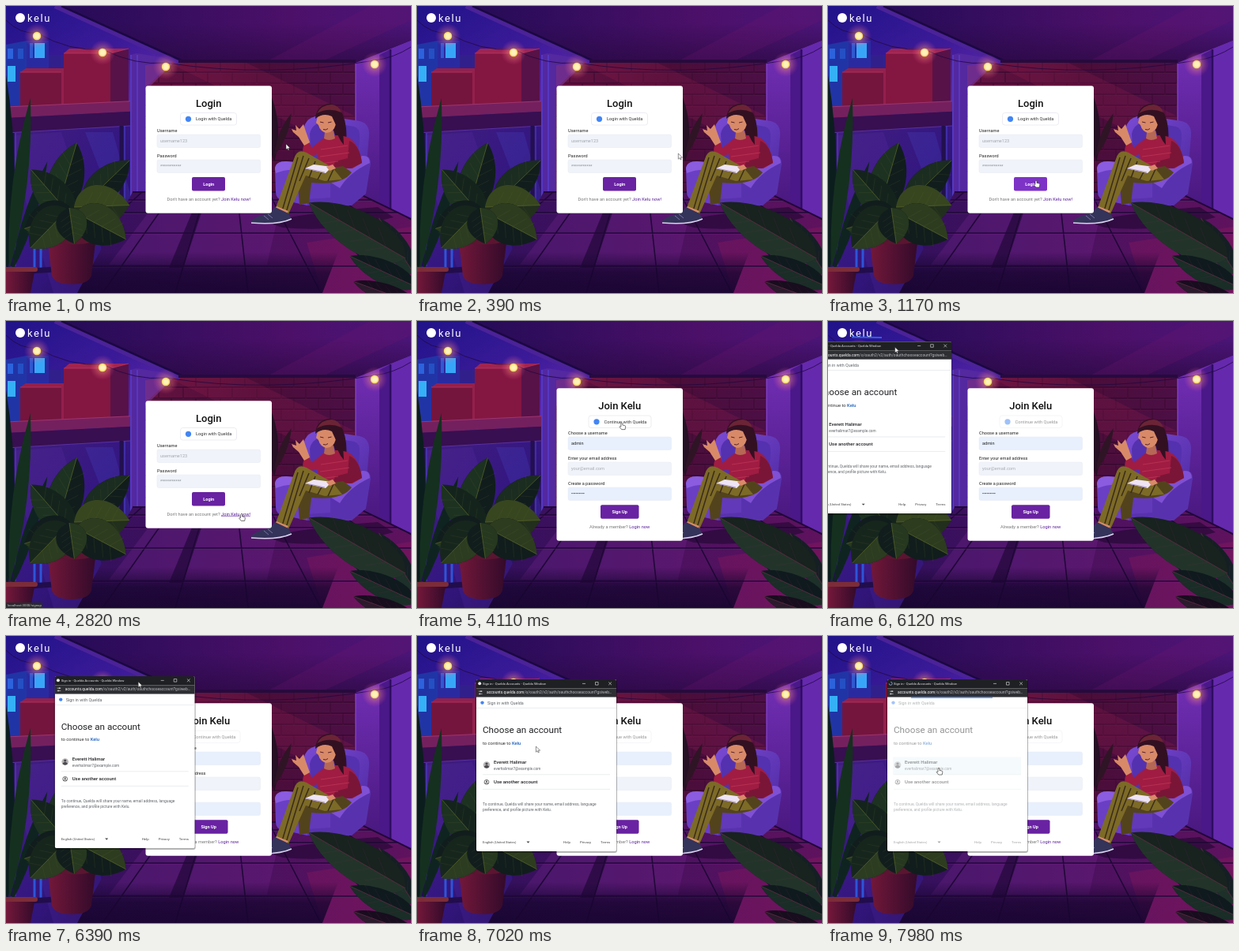
Animation, 512 px wide and 364 px high, one loop 8000 ms. Source, as an HTML page:

```html
<!DOCTYPE html>
<html lang="en">
<head>
<meta charset="utf-8">
<title>Sign-up flow</title>
<style>
html, body { margin: 0; width: 100%; height: 100%; overflow: hidden; background: #2c0c4c; }
svg { display: block; width: 100vw; height: 100vh; }
text { font-family: Roboto, "Open Sans", sans-serif; white-space: pre; }
</style>
</head>
<body>
<svg id="stage" viewBox="0 0 512 364" preserveAspectRatio="none">
  <defs>
    <linearGradient id="ceil"><stop offset="0" stop-color="#1c0a52"/><stop offset=".35" stop-color="#330d5e"/><stop offset=".7" stop-color="#4c1069"/><stop offset="1" stop-color="#4b1578"/></linearGradient>
    <linearGradient id="shade" x2="0" y2="1"><stop offset=".3" stop-color="#26083c" stop-opacity="0"/><stop offset="1" stop-color="#26083c" stop-opacity=".65"/></linearGradient>
    <linearGradient id="sky" x2="1" y2="1"><stop offset="0" stop-color="#20138a"/><stop offset=".5" stop-color="#3c1a98"/><stop offset="1" stop-color="#7030b8"/></linearGradient>
    <linearGradient id="glass" x2="1" y2="1"><stop offset="0" stop-color="#43207e"/><stop offset=".5" stop-color="#351781"/><stop offset="1" stop-color="#200b52"/></linearGradient>
    <linearGradient id="wall"><stop offset="0" stop-color="#661340"/><stop offset=".55" stop-color="#4b0d38"/><stop offset="1" stop-color="#4c0f46"/></linearGradient>
    <linearGradient id="side" x2="0" y2="1"><stop offset="0" stop-color="#7430b8"/><stop offset="1" stop-color="#401373"/></linearGradient>
    <linearGradient id="floor"><stop offset="0" stop-color="#32105c"/><stop offset=".45" stop-color="#471160"/><stop offset="1" stop-color="#5f125e"/></linearGradient>
    <linearGradient id="dusk" x2="0" y2="1"><stop offset="0" stop-color="#17052f" stop-opacity="0"/><stop offset=".5" stop-color="#17052f" stop-opacity=".75"/><stop offset="1" stop-color="#17052f" stop-opacity=".9"/></linearGradient>
    <linearGradient id="chair" x2="1" y2="1"><stop offset="0" stop-color="#7a4bd4"/><stop offset="1" stop-color="#4c279f"/></linearGradient>
    <linearGradient id="pot"><stop offset="0" stop-color="#74183a"/><stop offset="1" stop-color="#320a2a"/></linearGradient>
    <radialGradient id="glow"><stop offset="0" stop-color="#ffd060" stop-opacity=".6"/><stop offset="1" stop-color="#ff50a0" stop-opacity="0"/></radialGradient>
    <clipPath id="wallClip"><path d="M172 70H442V238H172z"/></clipPath>
    <clipPath id="floorClip"><path d="M160 236H442L512 270V364H90z"/></clipPath>
    <clipPath id="winClip"><rect width="177" height="218" rx="2"/></clipPath>
  </defs>
  <g id="scene"></g>
  <g id="login"></g>
  <g id="signup"></g>
  <g id="status"></g>
  <path id="streak" d="M30 20.5L68 21" stroke="#2b62e8" stroke-width="1.8"/>
  <g id="popup"></g>
  <g id="cursor"></g>
</svg>
<script>
const $ = id => document.getElementById(id);
const PURPLE = '#6822a2', HOVER = '#7d33c6', BLUE = '#4285f4';

const path = (d, fill, extra = '') => `<path d="${d}" fill="${fill}" ${extra}/>`;
const line = (d, color, w = 1, extra = '') => `<path d="${d}" fill="none" stroke="${color}" stroke-width="${w}" ${extra}/>`;
const box = (x, y, w, h, fill, r = 0, extra = '') => `<rect x="${x}" y="${y}" width="${w}" height="${h}" rx="${r}" fill="${fill}" ${extra}/>`;
const dot = (x, y, r, fill, extra = '') => `<circle cx="${x}" cy="${y}" r="${r}" fill="${fill}" ${extra}/>`;
const text = (x, y, size, s, fill = '#222', extra = '') => `<text x="${x}" y="${y}" font-size="${size}" fill="${fill}" ${extra}>${s}</text>`;
const mid = 'text-anchor="middle"', medium = 'font-weight="500"';
const times = (n, f) => Array.from({ length: n }, (_, i) => f(i)).join('');

// A broad leaf growing from (x, y) along an angle, one half lit.
function leaf(x, y, len, w, deg, dark, light, vein) {
  const veins = times(4, i => {
    const p = len * (.2 + i * .16);
    return `M${p} 0l${len * .15} ${-w * .5}M${p} 0l${len * .15} ${w * .5}`;
  });
  return `<g transform="translate(${x} ${y}) rotate(${deg})">` +
    path(`M0 0C${len * .1} ${-w} ${len * .7} ${-w} ${len} 0C${len * .7} ${w} ${len * .1} ${w} 0 0`, dark) +
    path(`M0 0C${len * .1} ${-w} ${len * .7} ${-w} ${len} 0z`, light) +
    line(`M0 0H${len}`, vein, .8, 'opacity=".8"') + line(veins, vein, .5, 'opacity=".3"') + '</g>';
}

function blade(x, y, len, w, deg, fill) {
  return path(`M0 0Q${len * .5} ${-w} ${len} 0Q${len * .5} ${w} 0 0`, fill, `transform="translate(${x} ${y}) rotate(${deg})"`);
}

function outside() {
  return path('M0 0H70L222 72V134H0z', 'url(#sky)') +
    path('M0 49L26 44V130H0z', '#2134a6') + path('M26 44H54V130H26z', '#2a2aa0') + path('M54 62H76V130H54z', '#31208c') +
    box(2, 76, 10, 20, '#35b0f6') + box(2, 54, 7, 13, '#2c62dc') + box(15, 54, 7, 13, '#2450c4') +
    box(36, 47, 13, 19, '#38a6f8') + box(30, 47, 4, 19, '#3058d0') +
    path('M18 84L25 79H74V130H18z', '#94204c') + path('M18 84H70V130H18z', '#74153e') +
    path('M73 60L80 54H155V128H73z', '#a02450') + path('M73 60H132V128H73z', '#831741') + path('M132 60L155 54V128H132z', '#571248') +
    line('M18 84H70M73 60H132L155 54', '#b73362', .8) +
    box(0, 130, 172, 234, 'url(#glass)') +
    path('M0 165L70 160 140 364H60z', '#6a38bc', 'opacity=".14"') + path('M100 160H135L172 290V345z', '#4a50d8', 'opacity=".2"') +
    path('M0 128L174 120V133L0 142z', '#74205f') + path('M0 142L174 133V151L0 161z', '#380f50') +
    line('M0 128L174 120', '#a0346f', 1.2) + line('M0 161L174 151', '#5a2fa4', 1) +
    line('M8 161V330M146 152V330', '#22104f', 5) + line('M12 161V330M150 152V320', '#4a3cc0', 1.2) +
    line('M36 302V336M44 302V336', '#2d55d8', 3) + line('M0 338L155 328', '#220d4c', 7);
}

function room() {
  const bricks = times(13, r => {
    const y = 70 + r * 14;
    return `M172 ${y}H442` + times(10, c => `M${178 + c * 31 + r % 2 * 15} ${y}v14`);
  });
  const tiles = times(13, i => `M${292 + (i - 6) * 40} 236L${306 + (i - 6) * 92} 364`);
  const rows = [246, 262, 288, 330].map(y => `M80 ${y}H512`).join('');
  return box(0, 0, 512, 364, 'url(#ceil)') + path('M70 0H512V60L442 72H222z', 'url(#shade)') +
    path('M400 70L512 18V0H460L330 70z', '#6c166c', 'opacity=".25"') + outside() +
    box(172, 70, 270, 168, 'url(#wall)') +
    `<g clip-path="url(#wallClip)">` + line(bricks, '#30082e', 1.3, 'opacity=".8"') +
    line(bricks, '#8a2450', .5, 'opacity=".45" transform="translate(0 1.2)"') +
    path('M202 70H300L442 140V190z', '#b82558', 'opacity=".16"') + '</g>' +
    path('M165 60L214 68 176 104V250H158V62z', '#54289f') + path('M176 75L212 72 176 108z', '#7a2f86', 'opacity=".7"') + line('M158 62V250M166 62V250', '#5438c0', 2) +
    line('M62 0L220 72', '#4b2298', 6) + line('M70 0L226 71', '#1b0842', 2.5) + path('M218 68H442V72H218z', '#270a3e') +
    path('M442 72L512 44V300L442 240z', 'url(#side)') + path('M472 62L486 55V266L472 258z', '#4a1888') +
    path('M486 55L512 44V290L486 266z', '#6529ae') + line('M486 55V266', '#2f0d62', 2.5) + line('M442 72V240', '#8140c6', 1.4) +
    path('M160 236H442L512 270V364H90z', 'url(#floor)') +
    `<g clip-path="url(#floorClip)">` + path('M180 262H345L330 328H130z', '#7a2a92', 'opacity=".28"') +
    path('M380 300L512 280V364H400z', '#98185c', 'opacity=".3"') +
    line(tiles + rows, '#200838', 1.6) + line(rows, '#7a2488', .5, 'opacity=".7" transform="translate(0 1.4)"') +
    path('M235 262L247 262 224 332H206z', '#210838', 'opacity=".7"') + path('M80 312H420L400 364H80z', 'url(#dusk)') + '</g>' +
    line('M160 236H442L512 270', '#220838', 2);
}

function reader() {
  const skin = '#d88a68', hair = '#321022';
  return path('M328 274Q380 262 470 255L490 268Q420 288 350 281z', '#1d0730', 'opacity=".6"') +
    blade(339, 198, 82, 13, -92, '#251024') + blade(339, 190, 58, 9, -68, '#2f1426') +
    // armchair
    path('M376 158Q378 138 402 139L447 146Q460 149 459 164L453 236H380z', 'url(#chair)') +
    path('M384 162Q387 147 406 147L440 153Q448 155 447 168L441 225H388z', '#5431ae') +
    path('M372 218L436 212V246L372 248z', '#6239b8') +
    path('M340 206Q341 197 354 197L374 199Q384 201 383 211L381 253 349 246Q341 244 341 236z', '#6a3fc4') +
    path('M340 206Q341 197 354 197L374 199Q384 201 383 211Q360 204 341 212z', '#8b5cdf') +
    path('M410 226Q412 208 426 204L450 190Q461 188 461 200L455 238 437 253 381 253V245L410 243z', '#5832ae') +
    path('M411 224Q413 208 426 204L450 190Q460 189 460 199Q434 211 422 231z', '#7f50d4') +
    // hair, sweater and raised arm
    path('M402 130Q418 122 426 138Q432 154 430 174L419 172 410 146z', hair) +
    path('M401 168Q415 161 431 166Q446 172 450 199L438 206 396 206 394 188 381 191Q372 186 377 176L384 173 386 180z', '#a01c42') +
    path('M434 171Q447 176 450 199L436 206 414 204 416 197 432 193z', '#7a1537') +
    line('M398 182L432 177M397 191L434 186M397 200L420 197', '#c03a58', .7) +
    path('M377 177L370 166 363 160 361 156 367 158 366 151 371 156 376 150 379 159 384 173z', skin) +
    path('M403 160L414 158 416 168Q408 172 402 168z', '#b66755') +
    path('M394 140Q402 133 413 138L417 150Q414 161 405 161Q397 159 395 151L392 148z', skin) +
    path('M391 143Q392 127 407 124Q421 123 425 140L427 176Q418 166 417 151L412 140Q401 135 391 143z', hair) +
    path('M393 136Q399 125 412 125Q421 126 424 135Q408 128 393 136z', '#6b2436') +
    line('M397 147l4.5 1M407 148l4.5-1M401 156.500q3.500 1.500 6-1', '#4a1526', .9) +
    // legs, book and shoe
    path('M426 203L437 211Q425 228 386 224L383 250 371 252 368 214z', '#53431c') +
    path('M413 205L380 186Q368 180 364 194L341 256 357 264 379 215 403 222 425 220z', '#7c6a27') +
    line('M369 192L349 260M376 190L354 262M383 193L371 222M391 197L383 218M403 203L394 220M414 207L407 222', '#3b2c1a', 1.5) +
    path('M378 206L389 201 412 204 404 212z', '#eee4f4') + line('M379 206L403 211', '#ad97cc', 1.2) +
    path('M405 204L413 201 417 206 409 209z', skin) +
    path('M342 254L357 260 353 266 339 261z', skin) +
    path('M309 273Q320 264 333 263L340 255 357 263 361 270Q344 277 314 276z', '#34335a') +
    line('M310 275Q344 278 361 270', '#d9d2ee', 1.6) + line('M326 266l6 5M331 264l6 5', '#8b87b6', .8);
}

function plants() {
  const dark = '#111d1c', green = '#1d3221', olive = '#37461f', vein = '#5d6a2c', pink = '#6b2c48';
  return blade(2, 340, 268, 22, -91, '#0c1d1e') + blade(4, 335, 220, 18, -83, '#15301f') + blade(-8, 300, 180, 18, -94, '#1b3a22') +
    blade(6, 340, 150, 14, -72, '#0f2420') +
    path('M0 332H37L31 364H0z', 'url(#pot)') + box(-4, 331, 44, 6, '#7c2c38', 3) +
    line('M84 300L62 240M84 300L108 240M84 300L45 275', '#1c3222', 3) +
    path('M52 292H114L108 342Q104 353 83 353Q62 353 58 342z', 'url(#pot)') + path('M51 290Q83 282 115 290V298Q83 307 51 298z', '#5a1530') +
    leaf(64, 262, 92, 30, -74, dark, green, vein) + leaf(100, 250, 78, 26, -44, dark, '#1b2c20', vein) +
    leaf(84, 268, 80, 28, -131, '#14241d', green, vein) + leaf(86, 262, 66, 32, 162, dark, '#26391f', vein) +
    leaf(86, 255, 70, 36, -2, '#222f1c', olive, vein) + leaf(88, 262, 72, 34, 28, dark, '#2d3c1f', vein) +
    leaf(78, 258, 68, 32, 134, '#17261d', '#2b3c20', vein) + leaf(80, 256, 46, 26, 82, dark, '#26381f', vein) +
    leaf(516, 340, 84, 18, -122, '#141f24', '#1d3029', pink) +
    leaf(505, 320, 141, 34, -150, '#18221f', '#22342a', pink) +
    leaf(518, 356, 92, 20, -155, '#0f1a1e', '#1a2d27', pink) +
    leaf(518, 378, 84, 16, -160, '#170d1e', '#2a1a2c', pink);
}

function lights() {
  const bulbs = [[39, 38], [122, 59], [202, 77], [466, 74]];
  return line('M0 18Q18 36 39 34Q80 58 122 55Q164 76 202 72Q330 92 466 69Q490 66 512 52', '#22083f', .8) +
    bulbs.map(([x, y]) => dot(x, y, 16, 'url(#glow)') + dot(x, y, 5.2, '#ffd76a') + dot(x, y, 3.8, '#fff2b8')).join('') +
    dot(18, 15, 6, '#fff') + text(27, 20, 13, 'kelu', '#fff', 'letter-spacing="1.6"');
}

const field = (y, label, value, fill, color) =>
  text(191, y - 3.3, 5.6, label) + box(191, y, 130.5, 16.5, fill, 2, 'stroke="#e4e9f3" stroke-width=".5"') + text(195, y + 10.2, 5.6, value, color);
const button = (id, x, y, w, label) =>
  box(x, y, w, 17.5, PURPLE, 2, `id="${id}"`) + text(256.2, y + 10.9, 5.6, label, '#fff', mid + ' font-weight="700"');
const social = (x, y, w, label) =>
  box(x, y, w, 15.5, '#fff', 3, 'stroke="#e6e6ec" stroke-width=".7"') + dot(x + 10, y + 7.8, 3.6, BLUE) + text(x + 19.5, y + 9.8, 5.7, label, '#333');
const card = (y, h, title) =>
  box(176.5, y, 159.5, h, '#fff', 3) + text(256.2, y + 26.8, 13, title, '#111', `${mid} ${medium}`);

$('scene').innerHTML = room() + reader() + plants() + lights();

$('login').innerHTML = card(101.3, 161.5, 'Login') + social(220.5, 135.5, 71, 'Login with Quelda') +
  field(163, 'Username', 'username123', '#f0f3f9', '#a3a7b0') +
  field(195, 'Password', '***********', '#f0f3f9', '#8b8f98') +
  button('loginBtn', 235, 217, 42, 'Login') +
  text(256.2, 246.5, 5.7, `Don't have an account yet? <tspan id="join" fill="#5a209a">Join Kelu now!</tspan>`, '#777', mid);

$('signup').innerHTML = card(85.3, 193.5, 'Join Kelu') + `<g id="social">${social(217, 120, 79, 'Continue with Quelda')}</g>` +
  field(147, 'Choose a username', 'admin', '#e8f0fe', '#222') +
  field(179, 'Enter your email address', 'your@email.com', '#f0f3f9', '#a9adb5') +
  field(211, 'Create a password', '•••••••••', '#e8f0fe', '#222') +
  button('signBtn', 232, 233.3, 48.5, 'Sign Up') +
  text(256.2, 262.8, 5.7, `Already a member? <tspan fill="#5a209a">Login now</tspan>`, '#777', mid);

$('status').innerHTML = box(0, 357, 46, 7, '#29292e') + text(2, 362, 4.3, 'localhost:3000/signup', '#c8c8cc');

const rule = y => line(`M8 ${y}H169`, '#dcdfe3', .6);
$('popup').innerHTML = box(-1, 0, 179, 220, '#000', 3, 'opacity=".3"') + '<g clip-path="url(#winClip)">' +
  box(0, 0, 177, 218, '#fff') + box(0, 0, 177, 11.5, '#1f2023') + box(0, 11.5, 177, 11, '#2e2f33') +
  dot(4.2, 5.3, 2, '#e4e6ea', 'id="favicon"') +
  line('M6.2 5.3A2 2 0 1 1 4.2 3.3', '#8ab4f8', .8, 'id="spinner"') +
  text(8, 6.8, 4.2, '', '#e6e6e8', 'id="winTitle"') +
  line('M134 5.4h4M150.5 3.5h3.6v3.6h-3.6zM167.2 3.4l3.8 3.8M171 3.4l-3.8 3.8', '#e6e6e8', .6) +
  line('M3 15.2h4.6M3 18.4h4.6', '#ccc', .7) + dot(6, 15.2, .9, '#ccc') + dot(4.4, 18.4, .9, '#ccc') +
  text(13, 18.4, 4.95, '', '#b9bbc0', 'id="address"') +
  '<g id="account">' + box(7, 98.5, 162, 22.5, '#f5fafc', 0, 'id="row"') +
  '<g id="content">' + dot(7.5, 29.6, 2.2, BLUE) + text(14, 31.6, 5.4, 'Sign in with Quelda', '#5f6368') + line('M0 36.3H177', '#dcdfe3', .6) +
  text(8, 68, 11.7, 'Choose an account', '#202124') +
  text(8, 82.5, 5.8, `to continue to <tspan fill="#1a5fc0" ${medium}>Kelu</tspan>`, '#333') +
  dot(13, 108.5, 4.3, '#b8b5b5') + dot(13, 107, 1.6, '#4d4a50') + path('M9.6 111Q13 106.5 16.4 111Q13 114.6 9.6 111', '#4d4a50') +
  text(22, 107, 6, 'Everett Halimar', '#202124', medium) + text(22, 114.6, 4.7, 'everhalimar7@example.com', '#5f6368') + rule(120.8) +
  dot(13, 130.3, 2.9, 'none', 'stroke="#333" stroke-width=".7"') + dot(13, 129.4, 1, '#333') + line('M11 132Q13 130.3 15 132', '#333', .7) +
  text(22, 132.3, 6, 'Use another account', '#202124', medium) + rule(139.3) +
  text(8, 160, 4.9, 'To continue, Quelda will share your name, email address, language', '#5f6368') +
  text(8, 167.3, 4.9, 'preference, and profile picture with Kelu.', '#5f6368') +
  text(8, 208, 4.2, 'English (United States)', '#444') + path('M63.5 205.5h4l-2 2.2z', '#444') +
  text(110, 208, 4.4, 'Help', '#444') + text(131, 208, 4.4, 'Privacy', '#444') + text(157, 208, 4.4, 'Terms', '#444') + '</g>' +
  '<rect id="progress" y="22.3" height="1.3" fill="#2f73e8"/></g></g>';

$('cursor').innerHTML =
  path('M0 0V7.2L1.7 5.6 2.8 8 3.9 7.5 2.9 5.2H5.2z', '#fff', 'id="arrow" stroke="#222" stroke-width=".5"') +
  path('M-1 1Q0-.6 1 1V3.4L4 4.1Q5 4.4 4.8 5.6L4.2 9H-.2L-2.8 5.7Q-2.8 4.4-1 5.4z', '#fff', 'id="hand" stroke="#222" stroke-width=".6"') +
  '<g id="blocked">' + dot(0, 0, 2.7, '#fff', 'stroke="#b3123f" stroke-width="1.2"') + line('M-1.9-1.9L1.9 1.9', '#b3123f', 1.2) + '</g>';

const ramp = (t, a, b) => Math.min(1, Math.max(0, (t - a) / (b - a)));
const ease = p => p * p * (3 - 2 * p);
const show = (id, on) => $(id).style.display = on ? '' : 'none';

// Eased travel through [time, x, y] stops.
function along(stops, t) {
  let [, x, y] = stops[0];
  for (let i = 1; i < stops.length; i++) {
    const [t0, x0, y0] = stops[i - 1], [t1, x1, y1] = stops[i];
    const p = ease(ramp(t, t0, t1));
    x += (x1 - x0) * p;
    y += (y1 - y0) * p;
  }
  return [x, y];
}

const windowStops = [[6050, -28, 24], [6490, 75, 55]];
const cursorStops = [
  [0, 354, 175], [1170, 263, 221], [1230, 263, 221], [2250, 297.5, 244.5], [3150, 297.5, 244.5],
  [4170, 258.5, 127.5], [5130, 258.5, 127.5], [5980, 77.5, 31], [6050, 77.5, 31],
  [6490, 180.5, 62], [6540, 180.5, 62], [7260, 140, 167]
];

let titleShown;
function setPage(loaded) {
  if (titleShown === loaded) return;
  titleShown = loaded;
  $('winTitle').textContent = (loaded ? 'Sign in - Quelda Accounts' : 'about:blank') + ' - Quelda Window';
  $('address').innerHTML = loaded
    ? '<tspan fill="#fff">accounts.quelda.com</tspan>/o/oauth2/v2/auth/oauthchooseaccount?gsiweb…'
    : '<tspan fill="#fff">about:blank</tspan>';
}

function draw(t) {
  const joined = t >= 3150, opened = t >= 4920, loaded = t >= 5600, busy = t >= 7440;
  const [x, y] = along(cursorStops, t), [wx, wy] = along(windowStops, t);

  show('login', !joined);
  show('signup', joined);
  const onLogin = !joined && x > 235 && x < 277 && y > 217 && y < 234.5;
  const onJoin = !joined && x > 272 && y > 241;
  $('loginBtn').setAttribute('fill', onLogin ? HOVER : PURPLE);
  $('join').setAttribute('text-decoration', onJoin ? 'underline' : 'none');
  show('status', !joined);
  $('status').setAttribute('opacity', ramp(t, 2670, 2820));
  $('social').setAttribute('opacity', 1 - .5 * ramp(t, 4470, 4620));

  const onSocial = joined && !loaded && x > 217 && x < 296 && y > 120 && y < 135.5;
  const onRow = loaded && y > wy + 98.5 && y < wy + 121;
  const kind = onSocial && t >= 4500 ? 'blocked' : onLogin || onJoin || onSocial || onRow ? 'hand' : 'arrow';
  for (const id of ['arrow', 'hand', 'blocked']) show(id, id === kind);
  $('cursor').setAttribute('transform', `translate(${x} ${y})`);

  show('popup', opened);
  show('streak', opened && t < 6240);
  $('popup').setAttribute('transform', `translate(${wx} ${wy})`);
  $('popup').setAttribute('opacity', ramp(t, 4890, 5040));
  setPage(loaded);
  show('account', loaded);
  show('row', onRow);
  show('favicon', !busy);
  show('spinner', busy);
  $('spinner').setAttribute('transform', `rotate(${(t - 7440) * .5} 4.2 5.3)`);
  $('content').setAttribute('opacity', 1 - .52 * ramp(t, 7440, 7620));
  const head = 133 * ramp(t, 7500, 7980), tail = 30 * ramp(t, 7700, 7980);
  $('progress').setAttribute('x', tail);
  $('progress').setAttribute('width', head - tail);
}

const start = performance.now();
function tick() {
  draw((performance.now() - start) % 8000);
  requestAnimationFrame(tick);
}
tick();
</script>
</body>
</html>
```
